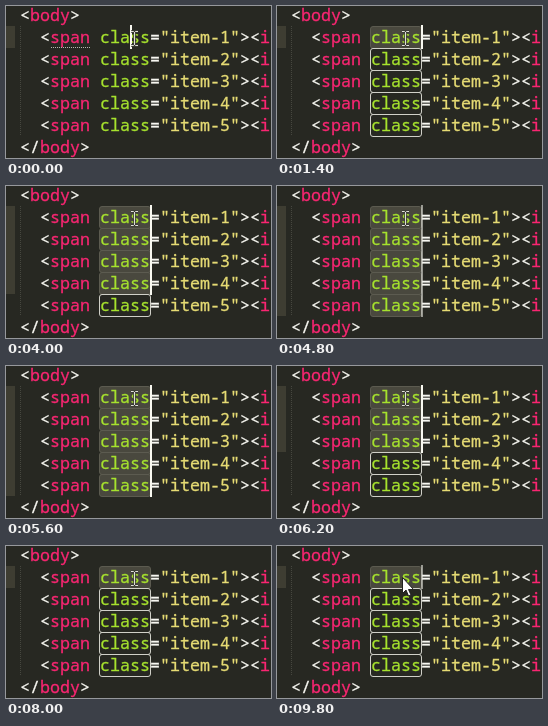
Animation of 265 by 152 pixels, one loop 10000 ms. Source, as an HTML page:

```html
<!DOCTYPE html>
<html lang="en">
<head>
<meta charset="utf-8">
<title>Multiple selection</title>
<style>
  html, body { margin: 0; width: 100%; height: 100%; overflow: hidden; background: #272822; }
  svg { display: block; width: 265px; height: 152px; }
  text { font: 16.667px "Noto Sans Mono", "DejaVu Sans Mono", monospace; white-space: pre; }
  tspan { color: #f8f8f2; fill: currentColor; stroke: currentColor; stroke-width: .3px; }
  .tag { color: #f92672; }
  .attr { color: #a6e22e; }
  .str { color: #e6db74; }
  .gutter { fill: #3e3d32; }
  .word { fill: none; stroke: #d0d0c8; }
  .word.selected { fill: #49483e; stroke: #5c5b50; }
  .caret { fill: #f8f8f0; }
  .dots { fill: none; stroke-dasharray: 1 1; }
</style>
</head>
<body>
<svg viewBox="0 0 265 152">
  <defs>
    <path id="beam-shape" d="M125 25.5H127.5L128.5 26.5L129.5 25.5H132M128.5 26V39M125 39.5H127.5L128.5 38.5L129.5 39.5H132"/>
  </defs>
  <path class="dots" d="M14.5 20V130" stroke="#46473f"/>
  <g id="marks"></g>
  <g id="code"></g>
  <path id="underline" class="dots" d="M45 41.5H84" stroke="#b8b8b0"/>
  <g id="carets"></g>
  <g id="beam" fill="none">
    <use href="#beam-shape" stroke="#3a3b34" stroke-width="2.5"/>
    <use href="#beam-shape" stroke="#deded8"/>
  </g>
  <path id="arrow" d="M125.5 31.5V47.5L129 44L131.5 50L134 49L131.5 43.5H136.5Z" fill="#fff" stroke="#222"/>
</svg>
<script>
const LOOP = 10000, TICK = 200, BLINK = 1000, HOLD = 200;
const ROWS = 5, ROW_H = 22, CHAR = 10;
const WORD_X = 94, WORD_END = WORD_X + 5 * CHAR;
const ADDS = [1400, 2200, 3000, 3800, 4400];
const UNDOS = [5800, 6200, 6600, 7400];
const PRESSES = [-HOLD, ...ADDS, ...UNDOS];
const ARROW_AT = 9800;

const $ = id => document.getElementById(id);
const rowTop = i => 20 + i * ROW_H;

function add(parent, name, attrs) {
  const el = document.createElementNS("http://www.w3.org/2000/svg", name);
  for (const key in attrs) el.setAttribute(key, attrs[key]);
  return parent.appendChild(el);
}

function addLine(x, row, tokens) {
  const text = add($("code"), "text", { x, y: rowTop(row) + 17 });
  for (const [content, kind = ""] of tokens)
    add(text, "tspan", { class: kind }).textContent = content;
}

function addRow(i) {
  const y = rowTop(i);
  addLine(34, i, [["<"], ["span", "tag"], [" "], ["class", "attr"], ["="],
    [`"item-${i + 1}"`, "str"], ["><"], ["i", "tag"]]);
  return {
    gutter: add($("marks"), "rect", { class: "gutter", x: 0, y, width: 9, height: ROW_H }),
    word: add($("marks"), "rect", { class: "word", x: WORD_X - .5, y: y + .5, width: 51, height: ROW_H, rx: 2.5 }),
    caret: add($("carets"), "rect", { class: "caret", y: y - 1, width: 2, height: ROW_H + 2 })
  };
}

addLine(14, -1, [["<"], ["body", "tag"], [">"]]);
const rows = Array.from({ length: ROWS }, (_, i) => addRow(i));
addLine(14, ROWS, [["</"], ["body", "tag"], [">"]]);

const show = (el, visible) => el.style.display = visible ? "" : "none";
const countBefore = (times, t) => times.filter(time => time <= t).length;

// Solid after each key press, then a soft clipped wave.
function caretLevel(t) {
  const age = t - PRESSES.findLast(time => time <= t);
  const phase = Math.max(0, age - HOLD) / BLINK;
  return Math.min(1, Math.max(0, .3 + .8 * Math.cos(2 * Math.PI * phase)));
}

function draw(time) {
  const t = Math.floor(time % LOOP / TICK) * TICK;
  const count = countBefore(ADDS, t) - countBefore(UNDOS, t);
  const active = Math.max(count, 1);
  rows.forEach(({ gutter, word, caret }, i) => {
    show(gutter, i < active);
    show(word, count > 0);
    word.classList.toggle("selected", i < count);
    show(caret, i < active);
    caret.setAttribute("x", count ? WORD_END : WORD_X + 3 * CHAR);
  });
  $("carets").style.opacity = caretLevel(t);
  show($("underline"), !count);
  show($("beam"), t < ARROW_AT);
  show($("arrow"), t >= ARROW_AT);
}

const start = performance.now();
function tick() {
  draw(performance.now() - start);
  requestAnimationFrame(tick);
}
tick();
</script>
</body>
</html>
```
